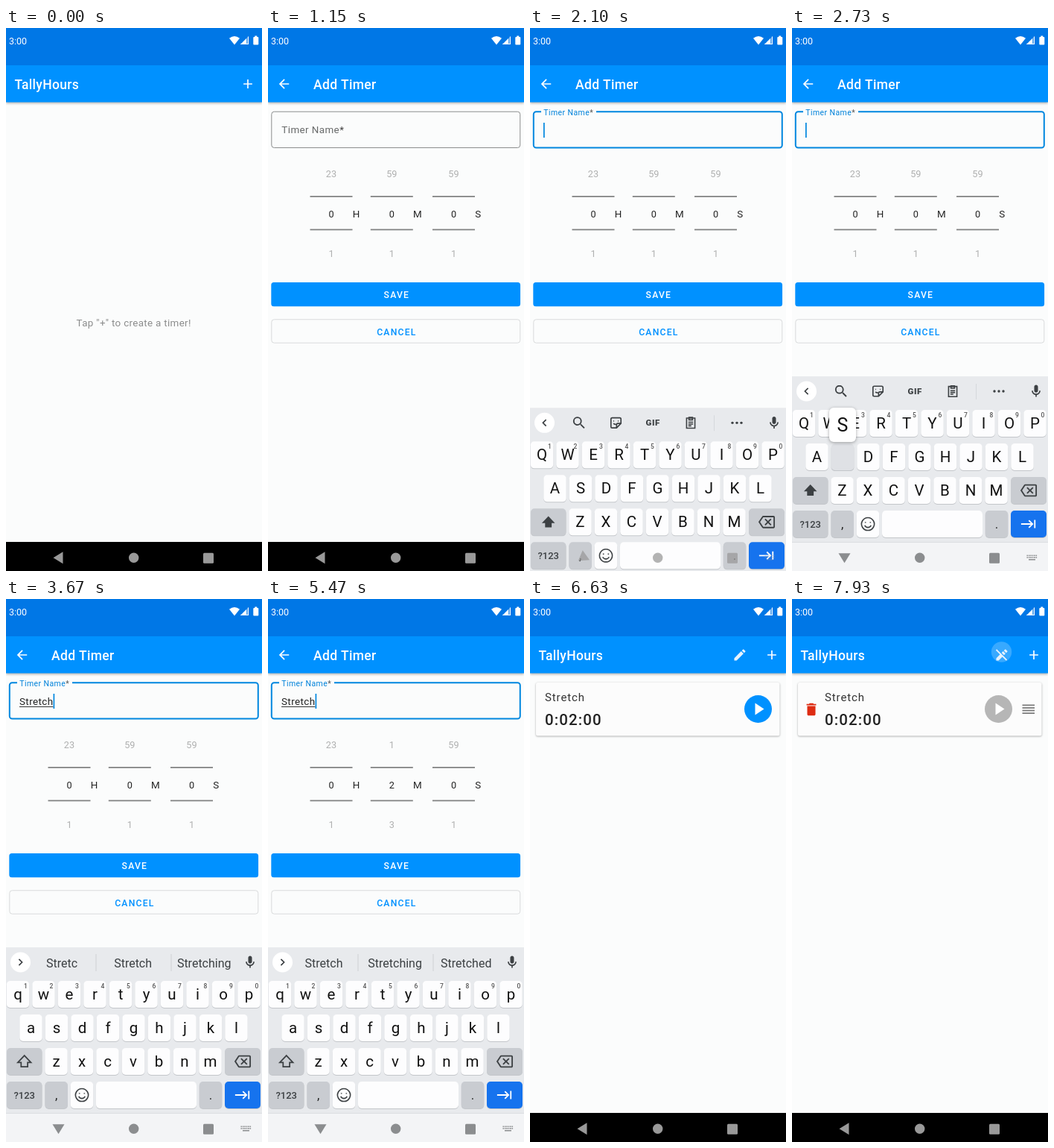
Write an HTML page with a canvas that moves like this. It is 344 px wide and 728 px high and loops after 7990 ms.

```html
<!DOCTYPE html>
<html lang="en">
<head>
<meta charset="utf-8">
<title>Timer app</title>
<style>
html, body { margin: 0; width: 100%; height: 100%; overflow: hidden; background: #fbfcfc; }
canvas { display: block; width: 344px; height: 728px; }
</style>
</head>
<body>
<canvas id="stage"></canvas>
<script>
const W = 344, H = 728, LOOP = 7990;
const BLUE = '#0091ff', PAGE = '#fbfcfc', KEY = '#fdfdfe', MOD = '#c9ccd1', INK = '#3c4043';
const WORD = 'Stretch';
const TYPED_AT = [2740, 2890, 3040, 3200, 3350, 3500, 3660];
const HINTS = ['', 'S|So|She', 'St|Still|Stop', 'Str|Straight|Street', 'Stre|Street|Stress',
  'Stret|Street|Stretch', 'Stretc|Stretch|Stretching', 'Stretch|Stretching|Stretched'];
const ROWS = [['qwertyuiop', 16, 530], ['asdfghjkl', 33.5, 575], ['zxcvbnm', 67.5, 620]];
const PITCH = 34.5;

// Icons on a 24 x 24 grid
const ICON = {
  back: 'M20 11H7.83l5.59-5.59L12 4l-8 8 8 8 1.41-1.41L7.83 13H20z',
  plus: 'M19 13h-6v6h-2v-6H5v-2h6V5h2v6h6z',
  edit: 'M3 17.25V21h3.75L17.81 9.94l-3.75-3.75zM20.71 7.04c.39-.39.39-1.02 0-1.41l-2.34-2.34c-.39-.39-1.02-.39-1.41 0l-1.83 1.83 3.75 3.75z',
  bin: 'M6 19c0 1.1.9 2 2 2h8c1.1 0 2-.9 2-2V7H6zM19 4h-3.5l-1-1h-5l-1 1H5v2h14z',
  shift: 'M12 3L2 13.5h5V20h10v-6.5h5z',
  erase: 'M22 3H7c-.69 0-1.23.35-1.59.88L0 12l5.41 8.11c.36.53.9.89 1.59.89h15c1.1 0 2-.9 2-2V5c0-1.1-.9-2-2-2zm0 16H7.07L2.4 12l4.66-7H22zm-11.59-2L14 13.41 17.59 17 19 15.59 15.41 12 19 8.41 17.59 7 14 10.59 10.41 7 9 8.41 12.59 12 9 15.59z',
  tab: 'M11.59 7.41L15.17 11H1v2h14.17l-3.59 3.59L13 18l6-6-6-6zM20 6v12h2V6z',
  mic: 'M12 14c1.66 0 3-1.34 3-3V5c0-1.66-1.34-3-3-3S9 3.34 9 5v6c0 1.66 1.34 3 3 3zm5-3c0 2.76-2.24 5-5 5s-5-2.24-5-5H5c0 3.53 2.61 6.43 6 6.92V21h2v-3.08c3.39-.49 6-3.39 6-6.92z',
  search: 'M15.5 14h-.79l-.28-.27A6.5 6.5 0 1 0 13.73 14.43l.27.28v.79l5 4.99L20.49 19zm-6 0A4.5 4.5 0 1 1 9.5 5a4.5 4.5 0 0 1 0 9z',
  smile: 'M12 3a9 9 0 1 0 .01 0M7.5 14a5 5 0 0 0 9 0M8.5 9v1.5M15.5 9v1.5',
  sticker: 'M20 13V6a2 2 0 0 0-2-2H6a2 2 0 0 0-2 2v12a2 2 0 0 0 2 2h7zh-5a2 2 0 0 0-2 2v5M8 9h1M15 9h1M8 13q2 2 4 1',
  clip: 'M5 4h14v17H5zM9 3h6v4H9zM8 11h8M8 14h8M8 17h5',
  next: 'M9.5 7l5 5-5 5', prev: 'M14.5 7l-5 5 5 5'
};
for (const name in ICON) ICON[name] = new Path2D(ICON[name]);

const stage = document.getElementById('stage');
const dpr = window.devicePixelRatio || 1;
stage.width = W * dpr;
stage.height = H * dpr;
const c = stage.getContext('2d');

const clamp = v => Math.max(0, Math.min(1, v));
const span = (t, from, dur) => clamp((t - from) / dur);
const ease = p => p * p * (3 - 2 * p);
const mix = (a, b, p) => a + (b - a) * p;

function faded(alpha, draw) {
  c.save();
  c.globalAlpha *= alpha;
  draw();
  c.restore();
}

function text(s, x, y, size, color, { weight = 400, gap = 0, align = 'left' } = {}) {
  c.font = `${weight} ${size}px Roboto, sans-serif`;
  c.letterSpacing = gap + 'px';
  c.textAlign = 'left';
  c.fillStyle = color;
  const w = c.measureText(s).width;
  c.fillText(s, align === 'center' ? x - (w - gap) / 2 : x, y);
  return w;
}

function rect(x, y, w, h, color, r = 0) {
  c.fillStyle = color;
  c.beginPath();
  c.roundRect(x, y, w, h, r);
  c.fill();
}

function frame(x, y, w, h, color, width, r) {
  c.strokeStyle = color;
  c.lineWidth = width;
  c.beginPath();
  c.roundRect(x, y, w, h, r);
  c.stroke();
}

function disc(x, y, r, color) {
  c.fillStyle = color;
  c.beginPath();
  c.arc(x, y, r, 0, 7);
  c.fill();
}

function poly(color, ...pts) {
  c.fillStyle = color;
  c.beginPath();
  for (let i = 0; i < pts.length; i += 2) c.lineTo(pts[i], pts[i + 1]);
  c.fill();
}

function icon(name, x, y, color, scale = .84, line = 0) {
  c.save();
  c.translate(x - 12 * scale, y - 12 * scale);
  c.scale(scale, scale);
  c.fillStyle = c.strokeStyle = color;
  c.lineWidth = line;
  if (line) c.stroke(ICON[name]); else c.fill(ICON[name]);
  c.restore();
}

function shadowed(blur, dy, color, draw) {
  c.save();
  c.shadowBlur = blur * dpr;
  c.shadowOffsetY = dy * dpr;
  c.shadowColor = color;
  draw();
  c.restore();
}

function bars() {
  shadowed(3, 1, 'rgba(0,0,0,.3)', () => rect(0, 50, W, 49.5, BLUE));
  rect(0, 0, W, 50, '#0077e6');
  text('3:00', 4, 21.5, 12.5, '#fff');
  c.fillStyle = '#fff';
  c.beginPath();
  c.moveTo(307, 22.5);
  c.lineTo(300, 13.7);
  c.quadraticCurveTo(307, 8.3, 314, 13.7);
  c.fill();
  poly('rgba(255,255,255,.35)', 315, 22, 326, 22, 326, 11);
  poly('#fff', 315, 22, 323, 22, 323, 14);
  poly('#fff', 325, 12, 326, 11, 326, 22, 315, 22, 316, 21, 325, 21);
  rect(332.3, 12, 7, 10.5, '#fff', 1);
  rect(334.3, 10.5, 3, 2, '#fff');
}

const title = (s, x) => text(s, x, 82, 17.5, '#fff', { weight: 500, gap: .3 });

function home(t) {
  const created = t > 6000, editing = t >= 7915;
  bars();
  title('TallyHours', 11.5);
  icon('plus', 325, 75, '#fff');
  if (!created) {
    text('Tap "+" to create a timer!', 171.5, 400, 13.4, '#8b8c8c', { gap: .32, align: 'center' });
    if (t >= 1005) disc(325, 75, mix(8, 16, span(t, 1005, 75)), 'rgba(255,255,255,.2)');
    return;
  }
  if (t >= 7845) disc(281.5, 71, mix(8, 13.7, span(t, 7845, 85)), 'rgba(255,255,255,.22)');
  icon('edit', 282, 75, '#e6f2fd');
  if (editing) {
    c.lineCap = 'butt';
    for (const [color, width, dx] of [['#2ba2ff', 2, 1.6], ['#e6f2fd', 1.8, 0]]) {
      c.strokeStyle = color;
      c.lineWidth = width;
      c.beginPath();
      c.moveTo(274.5 + dx, 68);
      c.lineTo(288.5 + dx, 82);
      c.stroke();
    }
  }
  faded(span(t, 6330, 150), () => card(editing));
}

function card(editing) {
  const x = editing ? 44 : 20, px = editing ? 277.5 : 306.5;
  shadowed(2.5, .7, 'rgba(0,0,0,.35)', () => rect(8, 112, 327.5, 71.5, '#fcfcfc', 2.5));
  text(WORD, x, 136.5, 15, '#333', { gap: .9 });
  text('0:02:00', x, 168.5, 20.5, '#222', { weight: 500, gap: 1.1 });
  disc(px, 147.5, 18.5, editing ? '#b6b6b6' : BLUE);
  poly('#fff', px - 4, 139.5, px + 8, 147.5, px - 4, 155.5);
  if (!editing) return;
  icon('bin', 26, 148, '#de2c12', .92);
  for (let i = 0; i < 4; i++) rect(309.5, 141.5 + i * 3.6, 16.5, 1.7, '#777');
}

function wheel(x, value, count, unit) {
  const base = Math.round(value);
  c.save();
  c.beginPath();
  c.rect(x - 28, 182, 57, 134);
  c.clip();
  for (let i = -2; i <= 2; i++) {
    const off = base + i - value;
    faded(Math.max(0, 1 - .65 * Math.abs(off)), () =>
      text(String((base + i + count) % count), x, 253.5 + off * 53.3, 12.7, '#222', { align: 'center' }));
  }
  c.restore();
  for (const y of [225, 269.5]) rect(x - 28.5, y, 57, 1.8, '#818282');
  text(unit, x + 28.7, 254, 13.4, '#222');
}

function addScreen(t, typed) {
  const f = ease(span(t, 1835, 165)), focused = t >= 1835;
  bars();
  icon('back', 21.5, 75, '#fff');
  title('Add Timer', 61);
  frame(4.8, 112.2, 334, 48.3, focused ? '#0087df' : '#8c8e8e', focused ? 2 : 1, 3.5);
  if (focused) rect(mix(52, 15, f), 110, 74 * f, 5, PAGE);
  const size = mix(13.4, 10.5, f), y = mix(141, 117, f);
  const w = text('Timer Name', 18.3, y, size, focused ? '#0082da' : '#686a6a', { gap: .42 });
  text('*', 18.3 + w, y, size, focused ? '#555' : '#444');
  if (focused) {
    const tw = text(WORD.slice(0, typed), 18, 142, 13.4, '#222', { gap: .42 });
    if (typed) rect(18, 144, tw, 1, '#333');
    rect(18 + tw, 127, 1.7, 20, '#0087df');
  }

  const minutes = ease(span(t, 3960, 400)) + ease(span(t, 4450, 1000));
  wheel(85, 0, 24, 'H');
  wheel(166.3, minutes, 60, 'M');
  wheel(249.5, 0, 60, 'S');

  rect(4.3, 341, 334.8, 32.2, BLUE, 3.5);
  if (t >= 6135) rect(4.3, 341, 334.8, 32.2, 'rgba(255,255,255,.2)', 3.5);
  text('SAVE', 172.3, 361.5, 12.2, '#fff', { weight: 500, gap: 1.2, align: 'center' });
  frame(4.8, 390.8, 334, 31.4, '#d9dbdc', 1, 3.5);
  text('CANCEL', 172.3, 411.5, 12.2, BLUE, { weight: 500, gap: 1.2, align: 'center' });
}

function key(x, y, w, color) {
  rect(x - w / 2, y - 17, w, 36, '#c3c6ca', 5);
  rect(x - w / 2, y - 18, w, 36, color, 5);
}

function keyboard(t, typed) {
  const upper = typed === 0;
  const face = ch => upper ? ch.toUpperCase() : ch;
  rect(0, 467, W, 222, '#e8eaed');
  rect(0, 689, W, 39, '#f3f4f6');
  rect(0, 689, W, 1, '#dcdee1');

  // Strip above the keys
  const hints = HINTS[TYPED_AT.filter(at => t >= at + 72).length];
  disc(19.5, 487, 13.5, '#fff');
  icon(upper ? 'prev' : 'next', 19.5, 487, INK, .84, 2);
  icon('mic', 328, 487, INK);
  if (t > 6195) {
    // No words are offered once the field is gone
  } else if (hints) {
    hints.split('|').forEach((s, i) => text(s, 75 + i * 95.6, 493.5, 16, INK, { align: 'center' }));
    for (const x of [120.5, 221.5]) rect(x, 476, 1, 23, '#cdd0d4');
  } else {
    icon('search', 66, 487, INK, .9);
    icon('sticker', 115.5, 487, INK, .84, 2);
    text('GIF', 165, 491, 11.5, INK, { weight: 900, gap: .6, align: 'center' });
    icon('clip', 216, 487, INK, .8, 2);
    rect(247, 477, 1, 21, '#d5d8dc');
    for (const x of [272, 278, 284]) disc(x, 487, 1.7, INK);
  }

  for (const [chars, x0, y] of ROWS) {
    [...chars].forEach((ch, i) => {
      const x = x0 + i * PITCH;
      key(x, y, 30.5, KEY);
      text(face(ch), x, y + 7, 20.5, '#111', { align: 'center' });
      if (y === 530) text(String((i + 1) % 10), x + 10.5, 522, 8.5, '#555', { weight: 500, align: 'center' });
    });
  }
  key(24.7, 620, 47.5, MOD);
  icon('shift', 24.7, 620, INK, .88, upper ? 0 : 2);
  key(318, 620, 48, MOD);
  icon('erase', 318, 620, INK, .92);
  key(24.7, 665, 47.5, MOD);
  text('?123', 24.7, 669.7, 13, INK, { weight: 500, align: 'center' });
  key(67.7, 665, 30.5, MOD);
  text(',', 67.7, 671, 17, '#222', { align: 'center' });
  key(102, 665, 30.5, KEY);
  icon('smile', 102, 665, INK, .95, 1.7);
  key(188.5, 665, 135, KEY);
  key(275, 665, 30.5, MOD);
  text('.', 275, 671, 17, '#222', { align: 'center' });
  key(318, 665, 48, '#1673ee');
  icon('tab', 318, 665, '#fff', .92);

  // Bubble over the pressed key
  const pressed = TYPED_AT.findIndex(at => t >= at - 82 && t < at);
  if (pressed < 0) return;
  const ch = WORD[pressed].toLowerCase();
  const [chars, x0, y] = ROWS.find(row => row[0].includes(ch));
  const x = x0 + chars.indexOf(ch) * PITCH;
  key(x, y, 30.5, '#dfe1e5');
  shadowed(4, 1, 'rgba(0,0,0,.35)', () => rect(x - 18, y - 66, 36, 46, '#fff', 6));
  text(face(ch), x, y - 34, 25, '#111', { align: 'center' });
}

function navIcons(turn) {
  const color = turn > .5 ? '#8b8d8f' : '#999';
  c.save();
  c.translate(70.5, 710.3);
  c.rotate(-Math.PI / 2 * turn);
  poly(color, -7, 0, 6, -8, 6, 8);
  c.restore();
  disc(171.7, 710.3, 6.7, color);
  rect(265, 703.7, 14, 14, color, 1.5);
  faded(turn, () => {
    for (let i = 0; i < 12; i++) rect(315.5 + i % 6 * 2.4, 706.5 + Math.floor(i / 6) * 2.6, 1.6, 1.6, color);
    rect(318, 712, 9, 1.5, color);
  });
}

function draw(t) {
  const typed = TYPED_AT.filter(at => t >= at).length;
  const rise = span(t, 2010, 212), fall = span(t, 6160, 185);
  c.setTransform(dpr, 0, 0, dpr, 0, 0);
  rect(0, 0, W, H, PAGE);
  if (t < 1075 || t >= 6200) home(t); else addScreen(t, typed);
  rect(0, 689, W, 39, '#000');
  if (rise > 0 && fall < 1) {
    faded(Math.min(1, rise * 2.4) * (1 - fall), () => {
      c.translate(0, 130 * ((1 - rise) ** 2 + fall));
      keyboard(t, typed);
    });
  }
  const shown = t < 6160 ? 1 : span(t, 6330, 120);
  const sliding = rise > 0 && rise < 1;
  faded(shown * (sliding ? .75 : 1), () => navIcons(t < 6300 ? ease(rise) : 0));
}

function tick() {
  draw(performance.now() % LOOP);
  requestAnimationFrame(tick);
}
tick();
</script>
</body>
</html>
```
